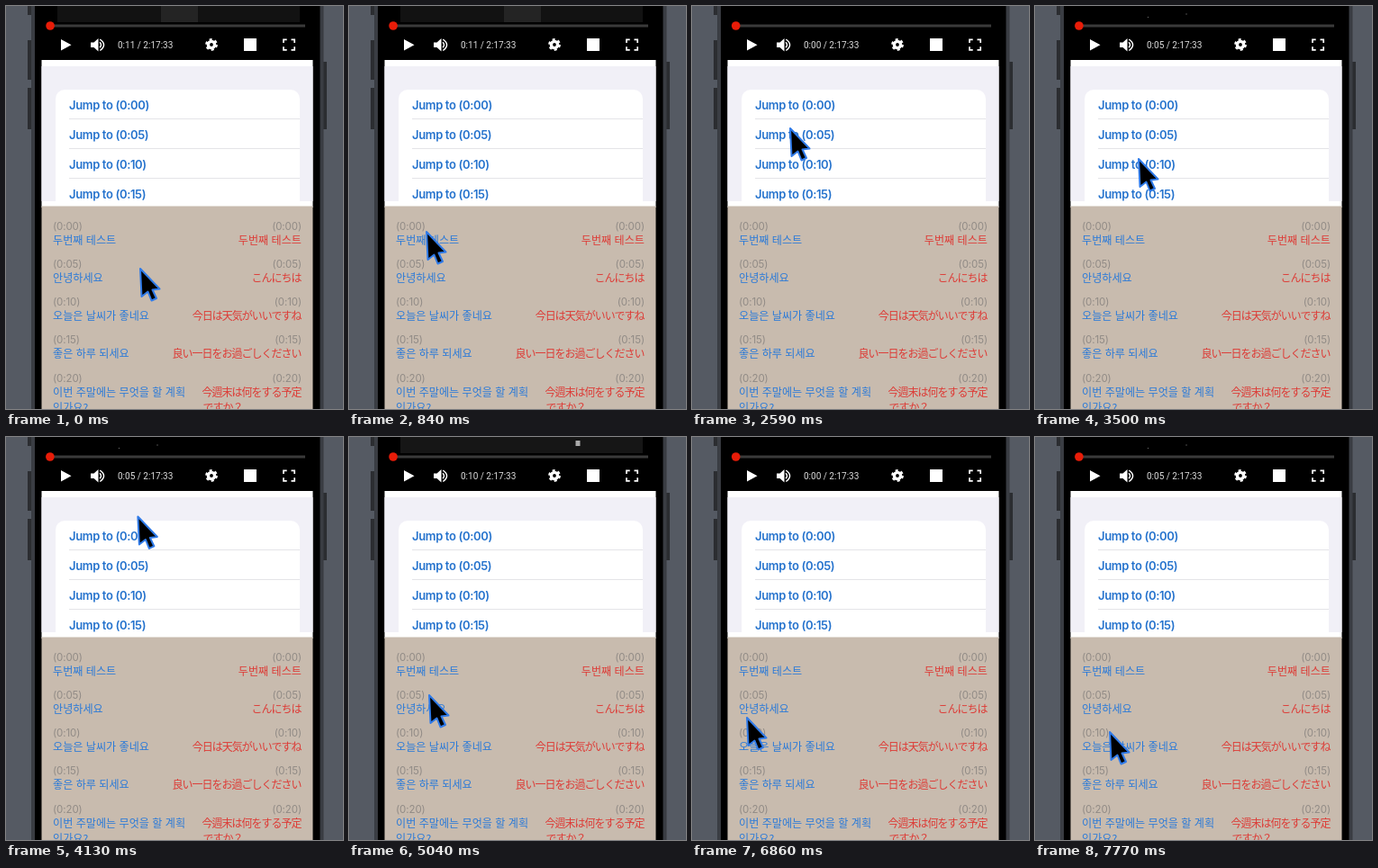
These frames come from a looping animation (374x448 px, 8000 ms). An HTML page:

```html
<!DOCTYPE html>
<html lang="ko">
<head>
<meta charset="utf-8">
<style>
  html, body { margin: 0; height: 100%; overflow: hidden; background: #555a63; }
  svg { display: block; width: 374px; height: 448px; }
  .jump { font: 600 13px Inter, sans-serif; letter-spacing: -.35px; fill: #2472cd; }
  .stamp { font: 11.5px Inter, sans-serif; letter-spacing: -.1px; fill: #918b86; }
  .ko { font: 12.1px "Noto Sans CJK KR", "Noto Sans CJK JP", sans-serif; fill: #2b7ad8; }
  .ja { font: 12px "Noto Sans CJK JP", sans-serif; letter-spacing: -1px; }
  .red { fill: #dd3b36; }
  .end { text-anchor: end; }
  #clock { font: 10px Roboto, sans-serif; fill: #ddd; }
</style>
</head>
<body>
<svg viewBox="0 0 374 448">
  <clipPath id="card"><rect x="55" y="93" width="271" height="140" rx="10"/></clipPath>

  <!-- phone body -->
  <path fill="#2b2d31" d="M24 0h4v10h-4zM24 38h4v44h-4zM24 91h4v46h-4zM352 62h4v75h-4z"/>
  <path fill="#3a3d43" d="M28 0H352.500V448H28z"/>
  <path d="M32 0H348.500V448H32z"/>

  <!-- video, one group per playback second -->
  <g id="at5" fill="#555"><circle cx="125.500" cy="12.500" r=".8"/><circle cx="168" cy="9" r=".8"/></g>
  <g id="at10"><path fill="#161616" d="M57 0H326V18H57z"/><path fill="#aaa" d="M251.500 4h5v6h-5z"/></g>
  <g id="at11"><path fill="#121212" d="M57 0H326V18H57z"/><path fill="#242424" d="M172 0h41v18h-41z"/></g>
  <path fill="#3a3a3a" d="M49 20.500H332V23.500H49z"/>
  <circle id="knob" cy="22" r="4.800" fill="#e81c08"/>
  <g fill="#fff">
    <path d="M61 37V49.500L72.500 43.200z"/>
    <path d="M94 40.500h3.500l5-4.500v14.500l-5-4.500H94z"/>
    <path fill="none" stroke="#fff" stroke-width="1.500" d="M104 40.300q3 2.900 0 5.800M104.300 37q8.500 6.200 0 12.500"/>
    <circle cx="228" cy="43" r="3.600" fill="none" stroke="#fff" stroke-width="3.400"/>
    <circle cx="228" cy="43" r="5.700" fill="none" stroke="#fff" stroke-width="2.400" stroke-dasharray="2.980"/>
    <path d="M264 36h14v14h-14z"/>
    <path fill="none" stroke="#fff" stroke-width="1.700" d="M308 41V37.300H311.700M316.500 37.300H320.200V41M320.200 45.200V48.900H316.500M311.700 48.900H308V45.200"/>
  </g>
  <text id="clock" x="124" y="47"></text>

  <!-- panels -->
  <path fill="#fff" d="M39.500 60H340.500V224H39.500z"/>
  <path fill="#f1f0f7" d="M39.500 67H340.500V217H39.500z"/>
  <g clip-path="url(#card)">
    <path fill="#fff" d="M55 93H326V217H55z"/>
    <path id="press" fill="#d1d1d6" d="M55 93H326V126H55z"/>
    <path stroke="#e4e4e8" d="M70 125.500H326M70 158.500H326M70 191.500H326"/>
  </g>
  <g id="jumps"></g>
  <path fill="#c8bbae" d="M39.500 222.500H340.500V448H39.500z"/>
  <g id="lines"></g>

  <path id="cursor" stroke="#2f7ae8" stroke-width="2" stroke-linejoin="round"
    d="M0 0L1.500 31L8.500 25.500L12.500 35.500L18 33L13.500 23.500L21.500 22.500z"/>
</svg>
<script>
const $ = id => document.getElementById(id);
const LOOP = 8000, STEP = 70;
const MOVE = 350, HOLD = 350, DELAY = 630;
const pad = n => String(n).padStart(2, '0');
const stamp = row => `(0:${pad(5 * row)})`;
const label = (cls, x, y, s) => `<text class="${cls}" x="${x}" y="${y}">${s}</text>`;

const phrases = [
  ['두번째 테스트', '두번째 테스트'],
  ['안녕하세요', 'こんにちは'],
  ['오늘은 날씨가 좋네요', '今日は天気がいいですね'],
  ['좋은 하루 되세요', '良い一日をお過ごしください'],
  ['이번 주말에는 무엇을 할 계획', '今週末は何をする予定']
];

for (let row = 0; row < 4; row++)
  $('jumps').innerHTML += label('jump', 70, 114.5 + 33 * row, 'Jump to ' + stamp(row));

$('lines').innerHTML = phrases.map(([ko, other], row) => {
  const y = 248.7 + 42.2 * row;
  return label('stamp', 52, y, stamp(row)) +
    label('stamp end', 328, y, stamp(row)) +
    label('ko', 52, y + 16, ko) +
    label(row ? 'ja red end' : 'ko red end', row ? 327.5 : 328, y + 16, other);
}).join('') + label('ko', 52, 450.5, '인가요?') + label('ja red', 218.5, 450.5, 'ですか？');

// pointer stops: arrival time, x, y
const stops = [
  [0, 149, 292], [350, 102, 279], [840, 86, 251], [1050, 77, 247],
  [1540, 131, 101], [1820, 122, 110], [2590, 109, 136], [3220, 115, 170],
  [4200, 150, 79], [4480, 145, 52], [5040, 89, 287], [5530, 74, 242],
  [6440, 54, 320], [6720, 61, 312], [7490, 76, 348], [7770, 83, 328]
];
// taps: time, second to seek to; the first three are on the buttons
const taps = [[1960, 0], [2870, 5], [3570, 10], [5390, 0], [6440, 5]];
const buttons = taps.slice(0, 3);

function tip(t) {
  const next = stops.findIndex(s => s[0] > t);
  if (next < 0) return stops.at(-1).slice(1);
  const [t0, x0, y0] = stops[next - 1], [t1, x1, y1] = stops[next];
  const u = Math.max(0, 1 - (t1 - t) / Math.min(MOVE, t1 - t0));
  const e = u * u * (3 - 2 * u);
  return [x0 + (x1 - x0) * e, y0 + (y1 - y0) * e];
}

function draw(now) {
  const t = Math.floor(now % LOOP / STEP) * STEP;
  const done = taps.filter(([at]) => at + DELAY <= t).pop();
  const sec = done ? done[1] : 11;
  $('clock').textContent = `0:${pad(sec)} / 2:17:33`;
  $('knob').setAttribute('cx', 48.7 + sec * 283 / 8253);
  for (const s of [5, 10, 11]) $('at' + s).style.display = s === sec ? '' : 'none';

  const hit = buttons.find(([at]) => t >= at && t < at + HOLD);
  $('press').style.opacity = hit ? Math.min(1, (hit[0] + HOLD - t) / 200) : 0;
  if (hit) $('press').setAttribute('transform', `translate(0 ${33 * hit[1] / 5})`);

  $('cursor').setAttribute('transform', `translate(${tip(t)})`);
  requestAnimationFrame(draw);
}
requestAnimationFrame(draw);
</script>
</body>
</html>
```
